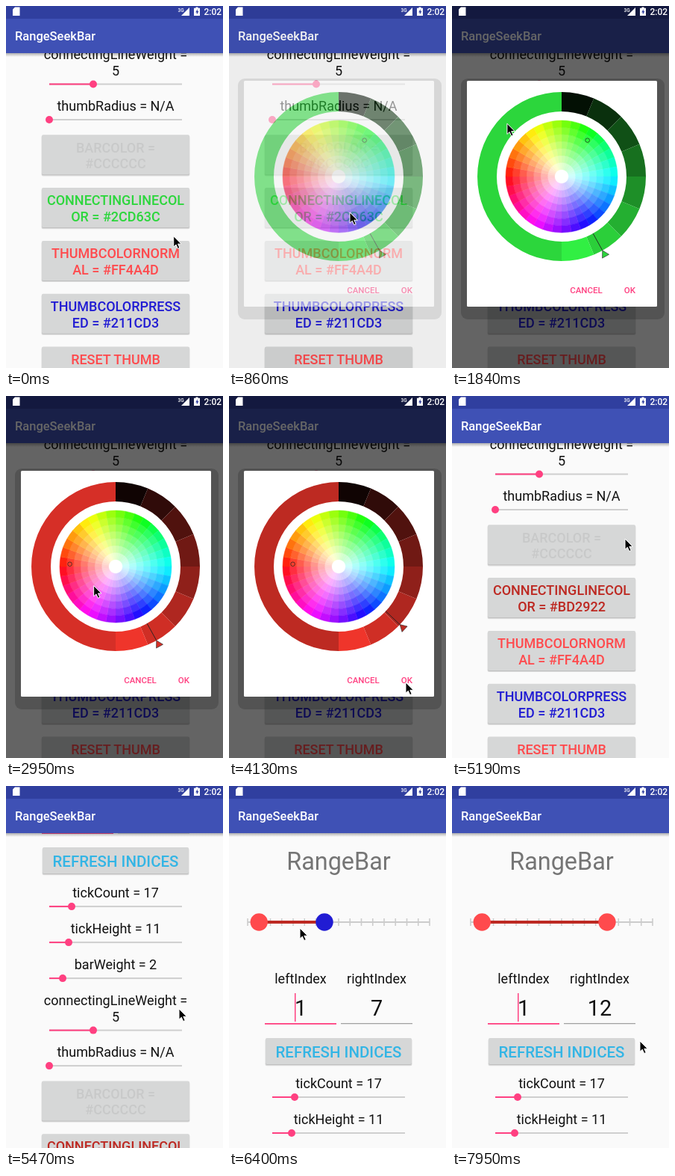
Write an HTML page that moves like this. It is 291x484 px and loops after 8000 ms.

```html
<!DOCTYPE html>
<html lang="en">
<head>
<meta charset="utf-8">
<title>RangeSeekBar</title>
<style>
html, body { margin: 0; width: 100%; height: 100%; overflow: hidden; background: #fafafa; }
svg { display: block; width: 100vw; height: 100vh; }
text { font-family: Roboto, sans-serif; font-size: 18px; fill: #111; white-space: pre; }
.mid { text-anchor: middle; }
.bold { font-weight: 500; }
</style>
</head>
<body>
<svg id="stage" viewBox="0 0 291 484"></svg>
<script>
const LOOP = 8000, SCROLL = 477, PINK = '#ff4081';
const CX = 147, CY = 228, WHEEL = 75, RING_IN = 87, RING_OUT = 113;
const BAR_X = 25, BAR_Y = 182, TICKS = 17, GAP = 244 / (TICKS - 1);
const OPEN = 800, CLOSE = 4460, PRESS = 6270, RELEASE = 7600;
const GREEN = { h: 125.6, s: .794 }, RED = { h: 3, s: .82 };

// ---- helpers ----
const range = n => [...Array(n).keys()];
const clamp = (v, lo, hi) => Math.min(hi, Math.max(lo, v));
const part = (t, a, b) => clamp((t - a) / (b - a), 0, 1);
const mix = (a, b, k) => a + (b - a) * k;

// Piecewise linear track of [time, ...values]
function track(keys, t) {
  let i = keys.findIndex(k => k[0] > t);
  if (i < 0) return keys[keys.length - 1].slice(1);
  if (i === 0) return keys[0].slice(1);
  const a = keys[i - 1], b = keys[i], k = part(t, a[0], b[0]);
  return a.slice(1).map((v, j) => mix(v, b[j + 1], k));
}

function hsv(h, s, v) {
  const f = n => {
    const k = (n + h / 60) % 6;
    return Math.round(255 * v * (1 - s * clamp(Math.min(k, 4 - k), 0, 1)));
  };
  return `rgb(${f(5)},${f(3)},${f(1)})`;
}

// Polar point around the wheel, degrees clockwise from the top
function polar(r, deg) {
  const a = deg * Math.PI / 180;
  return [CX + r * Math.sin(a), CY - r * Math.cos(a)].map(n => n.toFixed(2)).join(' ');
}
const sector = (r0, r1, a, b) =>
  `M${polar(r0, a)}L${polar(r1, a)}A${r1} ${r1} 0 0 1 ${polar(r1, b)}` +
  `L${polar(r0, b)}A${r0} ${r0} 0 0 0 ${polar(r0, a)}Z`;

const rect = (x, y, w, h, fill, more = '') =>
  `<rect x="${x}" y="${y}" width="${w}" height="${h}" fill="${fill}" ${more}/>`;
const label = (x, y, str, more = 'class="mid"') => `<text x="${x}" y="${y}" ${more}>${str}</text>`;

const buttonBox = (x, y, w, h) =>
  rect(x - .5, y + 1, w + 1, h + 1.2, '#000', 'rx="2.5" opacity=".12"') +
  rect(x, y + .5, w, h + .5, '#000', 'rx="2" opacity=".13"') +
  rect(x, y, w, h, '#d6d7d7', 'rx="2"');

function colorButton(i, color, lines) {
  const y = 172.3 + 70.8 * i + SCROLL;
  return buttonBox(48, y, 198, 53) + `<g id="btn${i}" fill="${color}">` +
    lines.map((s, n) => label(147, y + 23.3 + 21.5 * n, s, 'class="mid bold" style="fill:inherit"')).join('') + '</g>';
}

const seekBar = (y, x) =>
  rect(58, y - 1, 178, 2, '#cfcfcf') + rect(58, y - 1, x - 58, 2, PINK) +
  `<circle cx="${x}" cy="${y}" r="5" fill="${PINK}"/>`;

// ---- scene ----
const page = () =>
  label(147, 111.5, 'RangeBar', 'class="mid" style="font-size:32.4px;fill:#757575"') +
  rect(BAR_X, BAR_Y - 1, 244, 2, '#ccc') +
  range(TICKS).map(i => rect(BAR_X - .8 + i * GAP, BAR_Y - 5, 1.6, 10, '#ccc')).join('') +
  `<line id="link" x1="${BAR_X + GAP}" y1="${BAR_Y}" y2="${BAR_Y}" stroke="#bd2922" stroke-width="4"/>
   <circle cx="${BAR_X + GAP}" cy="${BAR_Y}" r="11.7" fill="#ff4a4d"/>
   <circle id="thumb" cy="${BAR_Y}" r="11.7"/>` +
  label(96, 264, 'leftIndex') + label(198, 264, 'rightIndex') +
  label(96, 307, '1', 'class="mid" style="font-size:28.8px"') +
  label(198, 307, '', 'id="index" class="mid" style="font-size:28.8px"') +
  rect(88, 277, 1.5, 38, PINK) + rect(48, 317, 96, 1.8, PINK) + rect(150, 317.2, 96, 1, '#8a8a8a') +
  buttonBox(49, 337, 196, 35) +
  label(147, 362.5, 'REFRESH INDICES', 'class="mid bold" style="font-size:20.5px;fill:#33b5e5"') +
  label(147, 404, 'tickCount = 17') + seekBar(416, 88) +
  label(147, 452, 'tickHeight = 11') + seekBar(464, 84) +
  label(147, 500, 'barWeight = 2') + seekBar(512, 76) +
  label(147, 71 + SCROLL, 'connectingLineWeight =') + label(147, 92.5 + SCROLL, '5') + seekBar(104.5 + SCROLL, 117) +
  label(147, 140 + SCROLL, 'thumbRadius = N/A') + seekBar(152 + SCROLL, 58) +
  colorButton(0, '#c8c9c9', ['BARCOLOR =', '#CCCCCC']) +
  colorButton(1, '', ['CONNECTINGLINECOL', '']) +
  colorButton(2, '#ff4a4d', ['THUMBCOLORNORM', 'AL = #FF4A4D']) +
  colorButton(3, '#211cd3', ['THUMBCOLORPRESS', 'ED = #211CD3']) +
  colorButton(4, '#ff4a4d', ['RESET THUMB', 'COLORS']);

const appBar = () =>
  rect(0, 63, 291, 5, 'url(#drop)') +
  rect(0, 0, 291, 17, '#303f9f') + rect(0, 17, 291, 46, '#3f51b5') +
  label(12, 46, 'RangeSeekBar', 'class="bold" style="font-size:16.5px;fill:#fff"');

const statusIcons = () =>
  `<g fill="#fff"><path d="M12 1.5h6.5v11.5h-9.5v-8.5z"/>
   <path d="M246 2v11h-11z"/>
   <path d="M254.5 2.8v-1.3h3v1.3h2.5v10.2h-8v-10.2z"/></g>
   <path d="M256.8 4.2l-2.6 4.3h1.6v3l2.6-4.4h-1.6z" fill="#303f9f"/>` +
  label(230.5, 7.5, '3G', 'class="bold" style="font-size:6.5px;fill:#fff"') +
  label(265.5, 11.8, '2:02', 'class="bold" style="font-size:12px;fill:#fff"');

function wheel() {
  const rings = 8, slices = 36, step = 360 / slices, w = WHEEL / rings;
  return range(rings * slices).map(n => {
    const k = Math.floor(n / slices), a = (n % slices) * step;
    const fill = hsv((a + step / 2 + 90) % 360, k ? (k + .55) / rings : 0, 1);
    return `<path d="${sector(k * w, (k + 1) * w, a, a + step)}" fill="${fill}" stroke="${fill}" stroke-width=".5"/>`;
  }).join('');
}

const dialog = () =>
  rect(12, 97, 273, 322, '#000', 'rx="9" opacity=".17"') +
  rect(20, 100, 255, 302, '#fff', 'rx="1.5"') +
  `<path id="solid" d="${sector(RING_IN, RING_OUT, 180, 360)}"/>` +
  range(8).map(i => `<path class="shade" d="${sector(RING_IN, RING_OUT, i * 22.5, i * 22.5 + 22.5)}"/>`).join('') +
  wheel() +
  `<circle id="pick" r="2.8" fill="none" stroke="#222" stroke-opacity=".75"/>
   <path id="needle" stroke="#222" stroke-width=".9"/>
   <path id="arrow" stroke="#333" stroke-width=".7"/>` +
  label(180, 383.5, 'CANCEL', `class="mid bold" style="font-size:11.5px;fill:${PINK}"`) +
  label(238.3, 383.5, 'OK', `class="mid bold" style="font-size:11.5px;fill:${PINK}"`);

const stage = document.getElementById('stage');
stage.innerHTML =
  `<defs><linearGradient id="drop" x2="0" y2="1"><stop stop-opacity=".3"/><stop offset="1" stop-opacity="0"/></linearGradient></defs>` +
  rect(0, 0, 291, 484, '#fafafa') +
  `<g id="page">${page()}</g>${appBar()}` +
  rect(0, 0, 291, 484, '#000', 'id="dim"') + statusIcons() +
  `<g id="dialog">${dialog()}</g>
   <path id="mouse" d="M0 0V14.2L3.3 11.2L5.7 16.6L8.2 15.5L5.8 10.3H10.3Z" fill="#000" stroke="#fff" stroke-width="1"/>`;

const el = id => document.getElementById(id);
const set = (node, attrs) => { for (const k in attrs) node.setAttribute(k, attrs[k]); };
const shades = [...stage.querySelectorAll('.shade')];
const lineLabel = el('btn1').lastElementChild;

// ---- motion ----
const MOUSE = [
  [0, 225, 308], [300, 146, 261], [450, 162, 276], [900, 162, 276],
  [1600, 118, 190], [1840, 74, 157], [2020, 54, 190], [2220, 72, 236], [2400, 86, 226],
  [2840, 86, 226], [3250, 203, 328], [3350, 203, 328], [3620, 229, 306], [3670, 229, 306], [4100, 237, 383],
  [4900, 237, 383], [5180, 232, 191], [5230, 232, 191], [5420, 232, 298],
  [6210, 232, 298], [PRESS, 254, 186], [6400, 95, 190], [6440, 97, 190], [6720, 205, 190], [6990, 100, 190],
  [7170, 42, 190], [7230, 42, 190], [7540, 208, 188], [7640, 208, 188], [7800, 233, 272], [7830, 234, 274], [7940, 252, 341]
];

function scrollAt(t) {
  if (t < 5420) return SCROLL - 107 * part(t, 5230, 5420);
  return (SCROLL - 107) * (1 - part(t, 5420, 5720)) ** 2;
}

function drawPicker(t) {
  const shown = t < 3000 ? part(t, OPEN, 910) : 1 - part(t, CLOSE, 4600);
  const dim = .6 * (t < 3000 ? part(t, 845, 1040) : 1 - part(t, CLOSE, 4660));
  set(el('dim'), { opacity: dim });
  set(el('dialog'), { opacity: shown, visibility: shown > 0 ? 'visible' : 'hidden' });
  if (!shown) return;

  const { h, s } = t < 2490 ? GREEN : RED;
  const v = mix(.839, .741, part(t, 3370, 3640)), turn = v * 180;
  const color = hsv(h, s, v);
  set(el('solid'), { fill: color });
  shades.forEach((p, i) => set(p, { fill: hsv(h, s, (i + .5) / 8) }));
  const [x, y] = polar(s * WHEEL, h - 90).split(' ');
  set(el('pick'), { cx: x, cy: y });
  set(el('needle'), { d: `M${polar(RING_IN, turn)}L${polar(RING_OUT, turn)}` });
  set(el('arrow'), { fill: color, d: `M${polar(RING_OUT, turn)}L${polar(122, turn - 2.4)}L${polar(122, turn + 2.4)}Z` });
}

function drawRange(t) {
  const held = t >= PRESS && t < RELEASE;
  const x = t < PRESS ? BAR_X + 15 * GAP : held ? track(MOUSE, Math.max(PRESS, t - 28))[0] : BAR_X + 12 * GAP;
  set(el('link'), { x2: x });
  set(el('thumb'), { cx: x, fill: held ? '#211cd3' : '#ff4a4d' });
  el('index').textContent = Math.round((x - BAR_X) / GAP);
}

function render(t) {
  set(el('page'), { transform: `translate(0 ${-scrollAt(t)})` });
  const hex = t < CLOSE ? '#2CD63C' : '#BD2922';
  set(el('btn1'), { fill: hex });
  lineLabel.textContent = 'OR = ' + hex;
  drawPicker(t);
  drawRange(t);
  set(el('mouse'), { transform: `translate(${track(MOUSE, t).join(' ')})` });
}

const start = performance.now();
function tick() {
  render((performance.now() - start) % LOOP);
  requestAnimationFrame(tick);
}
render(0);
requestAnimationFrame(tick);
</script>
</body>
</html>
```
